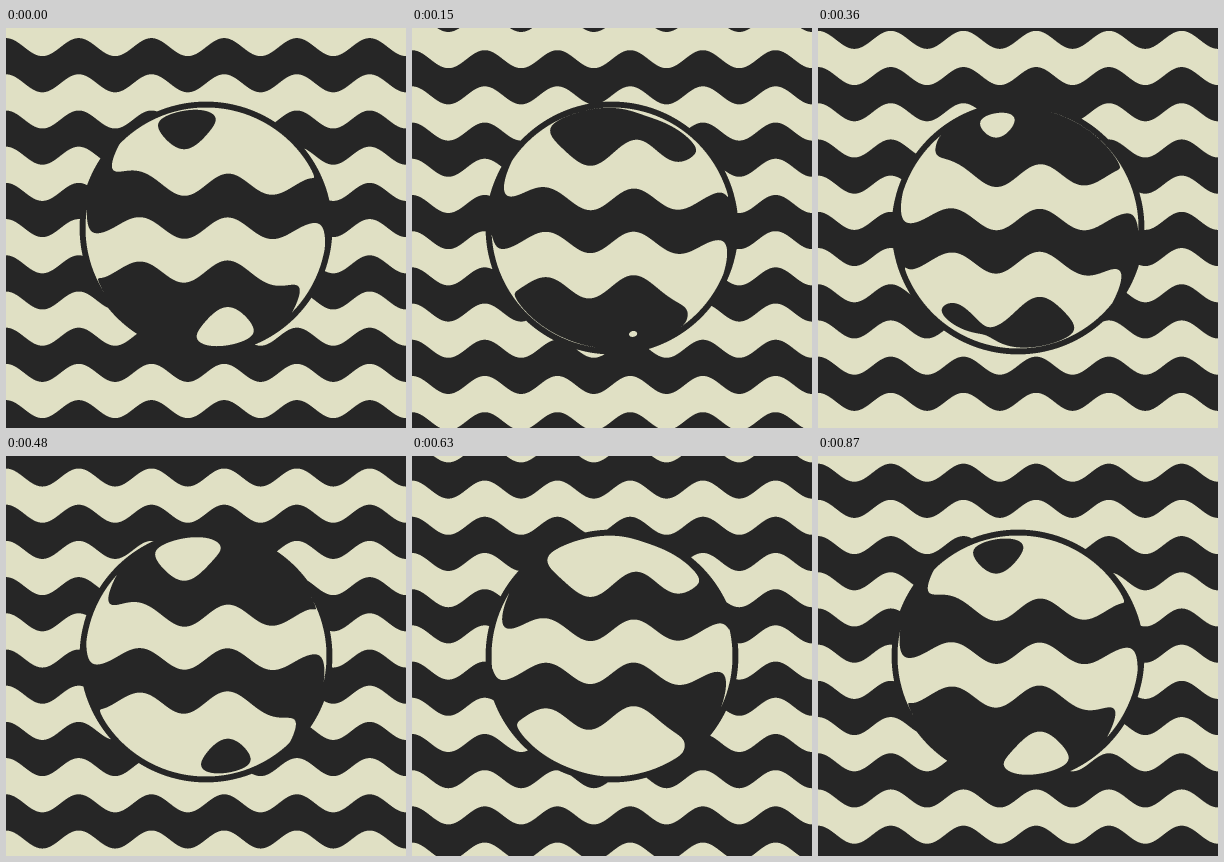
These frames come from a looping animation (400x400 px, 0.9 s). An HTML page with a canvas:

```html
<!DOCTYPE html>
<html lang="en">
<head>
<meta charset="utf-8">
<title>Waves through a glass ball</title>
<style>
  html, body { margin: 0; width: 100%; height: 100%; overflow: hidden; background: #262626; }
  canvas { display: block; width: 400px; height: 400px; }
</style>
</head>
<body>
<canvas id="stage" width="400" height="400"></canvas>
<script>
const SIZE = 400, MID = SIZE / 2;
const LOOP = 900, STEP = 30;
const WAVE = SIZE / 5.5, PITCH = 72.4, AMP = 9, START = 19.1;
const LENS = 120.5, RING = 126.4, INDEX = 1.15, DEPTH = 1.165;
const SUB = 3, TAPS = SUB * SUB;
const DARK = [38, 38, 38], LIGHT = [224, 224, 196];

const ctx = document.getElementById('stage').getContext('2d');
const image = ctx.createImageData(SIZE, SIZE);
const pixels = new Uint32Array(image.data.buffer);

// Ratio of the refracted radius to the radius seen on the ball.
function refract(r) {
  const x = r / LENS;
  const bend = Math.asin(x) - Math.asin(x / INDEX);
  return x ? 1 - DEPTH * Math.sin(bend) / x : 1;
}

// Stripe phase at a point; NaN marks the ring, which is always dark.
function phaseAt(x, y) {
  const dx = x - MID, dy = y - MID, r = Math.hypot(dx, dy);
  if (r > LENS && r < RING) return NaN;
  const k = r <= LENS ? refract(r) : 1;
  const sx = MID + dx * k, sy = MID + dy * k;
  return (sy + AMP * Math.cos(2 * Math.PI * sx / WAVE) - START) / PITCH;
}

const phase = new Float32Array(SIZE * SIZE * TAPS);
for (let y = 0, i = 0; y < SIZE; y++) {
  for (let x = 0; x < SIZE; x++) {
    for (let t = 0; t < TAPS; t++) {
      const u = (t % SUB + 0.5) / SUB, v = (Math.floor(t / SUB) + 0.5) / SUB;
      phase[i++] = phaseAt(x + u, y + v);
    }
  }
}

// One packed colour for each number of light taps.
const shades = Array.from({ length: TAPS + 1 }, (_, n) => {
  const [r, g, b] = DARK.map((d, c) => Math.round(d + (LIGHT[c] - d) * n / TAPS));
  return (255 << 24 | b << 16 | g << 8 | r) >>> 0;
});

function draw(shift) {
  for (let p = 0, i = 0; p < pixels.length; p++) {
    let light = 0;
    for (let t = 0; t < TAPS; t++) {
      const f = phase[i++] - shift;
      if (f - Math.floor(f) >= 0.5) light++;
    }
    pixels[p] = shades[light];
  }
  ctx.putImageData(image, 0, 0);
}

let shown = -1;
function tick() {
  const step = Math.floor(performance.now() % LOOP / STEP);
  if (step !== shown) {
    shown = step;
    draw(step * STEP / LOOP);
  }
  requestAnimationFrame(tick);
}
tick();
</script>
</body>
</html>
```
